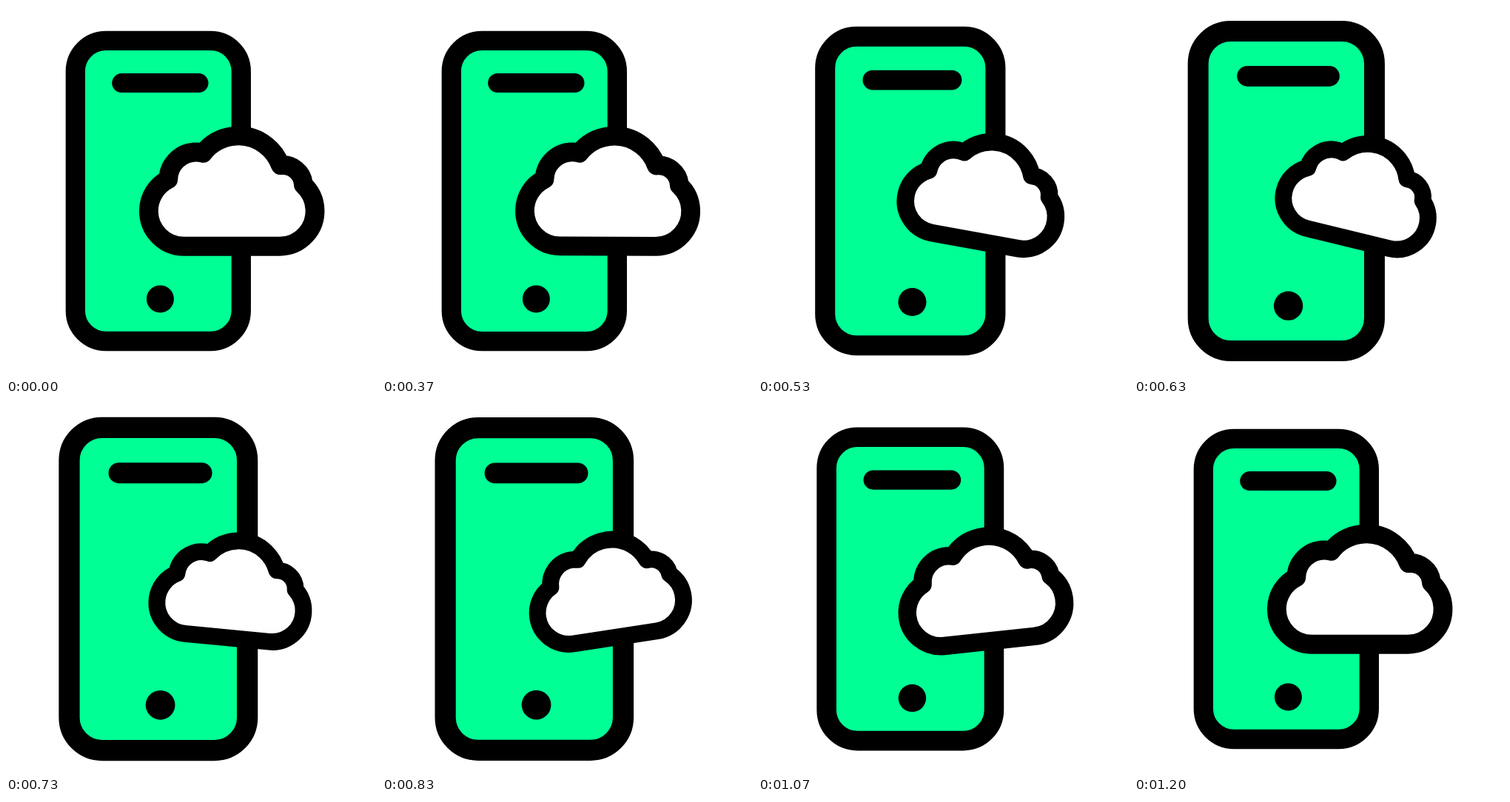
Write an HTML page with a canvas that moves like this. It is 500x500 px and loops after 1370 ms.

```html
<!DOCTYPE html>
<html lang="en">
<head>
<meta charset="utf-8">
<title>Phone and cloud</title>
<style>
html, body { margin: 0; width: 100%; height: 100%; overflow: hidden; background: #fff; }
canvas { display: block; width: 500px; height: 500px; }
</style>
</head>
<body>
<canvas id="stage" width="500" height="500"></canvas>
<script>
const ctx = document.getElementById('stage').getContext('2d');
const LOOP = 1370, START = 10.25, END = 36;   // START and END in steps of 1/30 s
const THIRD = (END - START) / 3, MID = (START + END) / 2;
const TILT = 13.7 * Math.PI / 180, SHRINK = 0.116, GROW = 0.075;

// Lobes of the cloud, clockwise from the lower left: x, y, radius
const lobes = [
  [240.6, 277, 47.75], [256.8, 235, 37.5], [314, 236, 60.5],
  [374, 243, 28], [369.8, 277, 47.75]
];

// Outer crossing of two neighbouring lobes
function crossing([x1, y1, r1], [x2, y2, r2]) {
  const d = Math.hypot(x2 - x1, y2 - y1);
  const a = (r1 * r1 - r2 * r2 + d * d) / (2 * d);
  const h = Math.sqrt(r1 * r1 - a * a);
  const ux = (x2 - x1) / d, uy = (y2 - y1) / d;
  return [x1 + a * ux + h * uy, y1 + a * uy - h * ux];
}

function cloudPath() {
  const path = new Path2D();
  const last = lobes.length - 1;
  lobes.forEach((lobe, i) => {
    const [x, y, r] = lobe;
    const from = i ? crossing(lobes[i - 1], lobe) : [x, y + r];
    const to = i < last ? crossing(lobe, lobes[i + 1]) : [x, y + r];
    path.arc(x, y, r, Math.atan2(from[1] - y, from[0] - x), Math.atan2(to[1] - y, to[0] - x));
  });
  path.closePath();
  return path;
}

function roundRect(x, y, w, h, r) {
  const path = new Path2D();
  path.moveTo(x + r, y);
  path.arcTo(x + w, y, x + w, y + h, r);
  path.arcTo(x + w, y + h, x, y + h, r);
  path.arcTo(x, y + h, x, y, r);
  path.arcTo(x, y, x + w, y, r);
  path.closePath();
  return path;
}

const cloud = cloudPath();
const body = roundRect(93.8, 46.9, 224, 406.1, 41.3);

const clamp = v => Math.min(1, Math.max(0, v));
const sine = v => (1 - Math.cos(Math.PI * clamp(v))) / 2;

// cubic-bezier(.6, 0, .4, 1)
function swell(v) {
  let lo = 0, hi = 1;
  for (let i = 0; i < 24; i++) {
    const s = (lo + hi) / 2, q = 1 - s;
    if (1.8 * s * q * q + 1.2 * s * s * q + s * s * s < v) lo = s; else hi = s;
  }
  return lo * lo * (3 - 2 * lo);
}

function place(x, y, scale, angle, paint) {
  ctx.save();
  ctx.translate(x, y);
  ctx.rotate(angle);
  ctx.scale(scale, scale);
  ctx.translate(-x, -y);
  paint();
  ctx.restore();
}

function paintPhone() {
  ctx.fillStyle = '#00ff94';
  ctx.lineWidth = 26.3;
  ctx.fill(body);
  ctx.stroke(body);
  ctx.lineWidth = 26;
  ctx.beginPath();
  ctx.moveTo(156.2, 104.1);
  ctx.lineTo(260.5, 104.1);
  ctx.stroke();
  ctx.fillStyle = '#000';
  ctx.beginPath();
  ctx.arc(208.4, 395.9, 18.5, 0, 2 * Math.PI);
  ctx.fill();
}

function paintCloud() {
  ctx.fillStyle = '#fff';
  ctx.lineWidth = 25.8;
  ctx.fill(cloud);
  ctx.stroke(cloud);
}

function draw(ms) {
  const step = Math.floor((Math.floor(ms / 10) + 0.5) * 0.3);
  const grow = swell(clamp(1 - Math.abs(step - MID) / (MID - START)));
  const rise = sine((step - START) / THIRD);
  const swing = sine((step - START) / THIRD - 1);
  const settle = sine((step - START) / THIRD - 2);

  ctx.fillStyle = '#fff';
  ctx.fillRect(0, 0, 500, 500);
  ctx.strokeStyle = '#000';
  ctx.lineCap = ctx.lineJoin = 'round';
  place(205.8, 250, 1 + GROW * grow, 0, paintPhone);
  place(305.2, 250.2, 1 - SHRINK * (rise - settle), TILT * (rise - 2 * swing + settle), paintCloud);
}

const begin = performance.now();
function tick() {
  draw((performance.now() - begin) % LOOP);
  requestAnimationFrame(tick);
}
tick();
</script>
</body>
</html>
```
